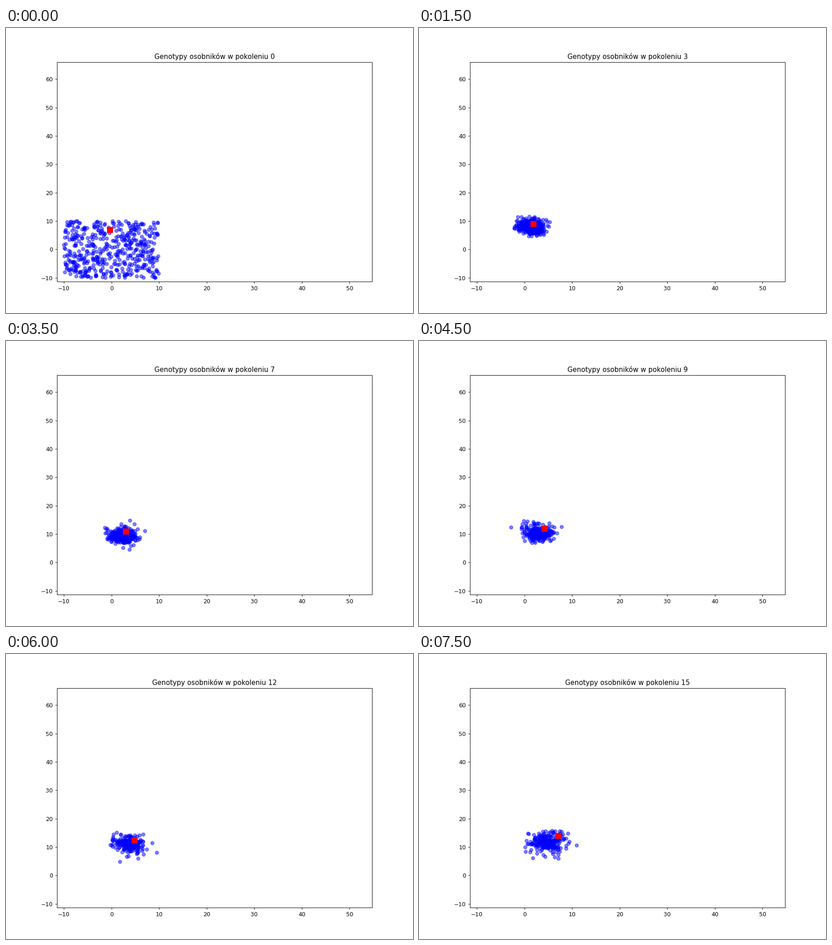
A matplotlib script for the animation above (8000 ms loop, 894 by 626 pixels).

```python
import numpy as np
import matplotlib.pyplot as plt
from matplotlib.animation import FuncAnimation

GENERATIONS = 16
INTERVAL = 500  # ms
POPULATION = 500
SURVIVORS = 16

# Key points of the best individual's path
KEYS = [0, 1, 3, 7, 10, 12, 15]
BEST_X = [-0.30, 0.22, 1.90, 3.00, 4.72, 4.86, 7.06]
BEST_Y = [6.93, 7.33, 9.02, 10.87, 12.47, 12.47, 14.00]


def best(gen):
    return np.interp(gen, KEYS, BEST_X), np.interp(gen, KEYS, BEST_Y)


def distinct(gen):
    """Number of distinct genotypes; it falls as offspring repeat."""
    if gen == 1:
        return SURVIVORS
    return int(np.clip(POPULATION - 33 * (gen - 3), 250, POPULATION))


def population(gen):
    rng = np.random.default_rng(40 + gen)
    if gen == 0:
        return rng.uniform(-10, 10, (POPULATION, 2))
    # The cloud drifts after the optimum, wide at first and later again
    centre = 1 + 0.12 * gen + 0.0085 * gen**2, 6.6 + 0.5 * gen - 0.01 * gen**2
    spread = min(1.9, 1.1 + 0.055 * gen + 30 * np.exp(-2 * gen))
    count = distinct(gen)
    offsets = rng.normal(size=(count, 2)).clip(-2.8, 2.8)
    offsets *= rng.uniform(0.5, 1.3, (count, 1))
    return centre + spread * offsets


fig, ax = plt.subplots(figsize=(10, 7.0023), dpi=89.4)
fig.subplots_adjust(right=0.8994)
ax.set_xlim(-11.46, 54.74)
ax.set_ylim(-11.38, 65.97)
title = ax.set_title("")
people = ax.scatter([], [], color="blue", alpha=0.5)
leader = ax.scatter([], [], s=100, color="red", marker="s")


def draw(gen):
    people.set_offsets(population(gen))
    leader.set_offsets([best(gen)])
    title.set_text(f"Genotypy osobników w pokoleniu {gen}")
    return people, leader, title


anim = FuncAnimation(fig, draw, frames=GENERATIONS, interval=INTERVAL,
                     repeat=True, repeat_delay=0)
plt.show()
```
